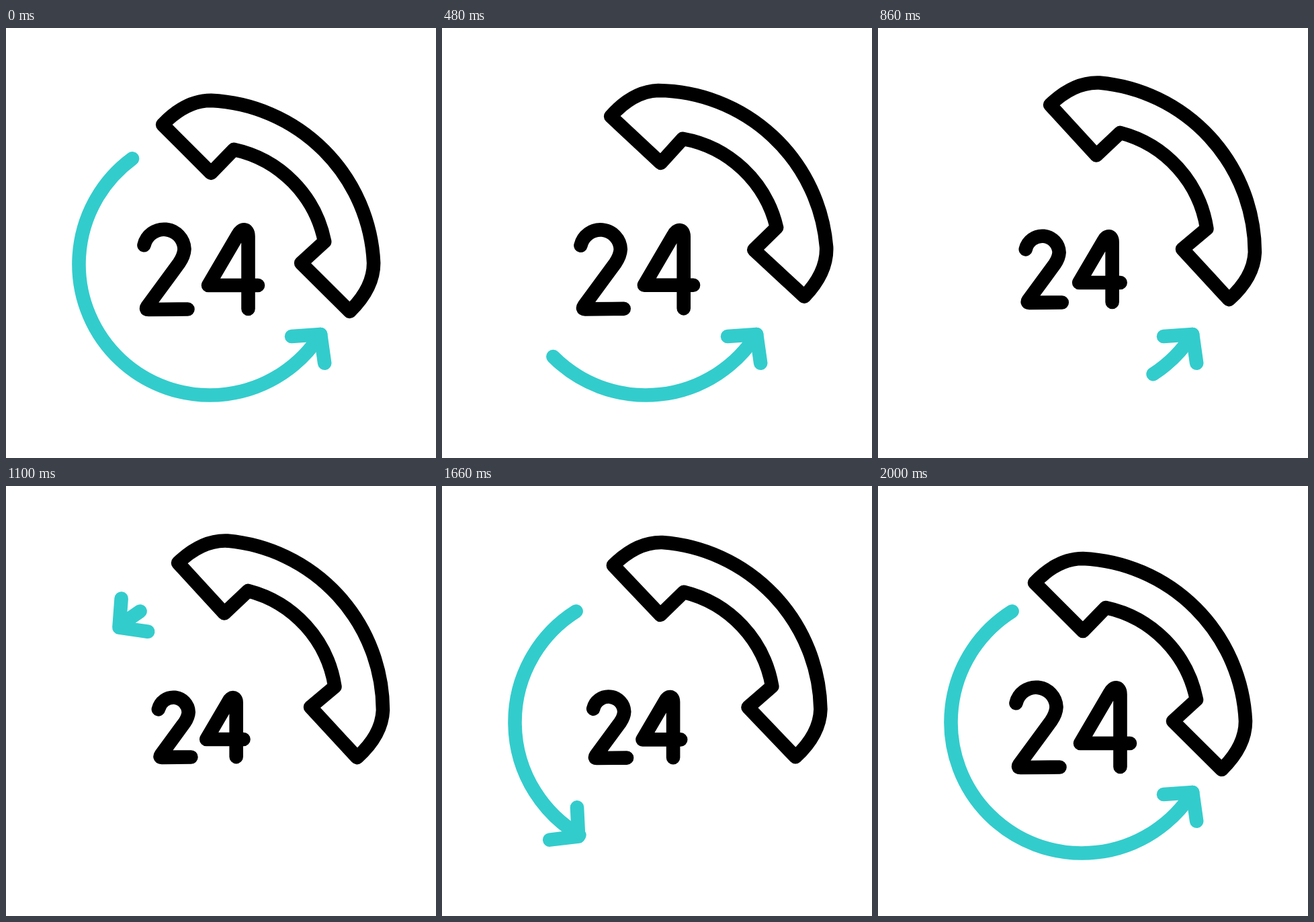
These frames come from a looping animation (640x640 px, 2180 ms). An HTML page:

```html
<!DOCTYPE html>
<html lang="en">
<head>
<meta charset="utf-8">
<title>24 hour call</title>
<style>
  html, body { margin: 0; width: 100%; height: 100%; overflow: hidden; background: #fff; }
  svg { display: block; width: 100%; height: 100%; }
  path { fill: none; stroke: #000; stroke-width: 20.6; stroke-linecap: round; stroke-linejoin: round; }
  .teal { stroke: #33cccc; }
</style>
</head>
<body>
<svg viewBox="0 0 640 640">
  <path id="ring" class="teal"/>
  <path id="head" class="teal"/>
  <path id="digits" d="M205.5 323.3A30.4 30.4 0 0 1 265.5 329Q265 339 257.5 350L210.5 414Q207 419 212 419L270.5 418.5
    M375 383H301L345 308C350 297.5 360.5 297.5 360.5 310V418"/>
  <path id="phone" d="M233 144C252 124 277 108 305 108A254 254 0 0 1 547 350C547 378 531 403 511.5 422L439 350L474 318
    A175 175 0 0 0 339 181L305 216Z"/>
</svg>
<script>
const LOOP = 2180, STEP = 20;
const CENTER = { x: 303.5, y: 351.5 }, RADIUS = 195;
const START = 237.8, SWEEP = 205.4;   // degrees, running counter-clockwise
const END_HEADING = -51;
const PIVOT = "453 206", MIDDLE = { x: 290, y: 359 };
const BARB = 43.2, SPREAD = 47;

const [ring, head, digits, phone] =
  ["ring", "head", "digits", "phone"].map(id => document.getElementById(id));

const linear = u => u;
const smooth = u => u * u * (3 - 2 * u);

// Keys are [time, value] pairs.
function keyed(t, keys, ease) {
  if (t <= keys[0][0]) return keys[0][1];
  for (let i = 1; i < keys.length; i++) {
    const [t0, a] = keys[i - 1], [t1, b] = keys[i];
    if (t <= t1) return a + (b - a) * ease((t - t0) / (t1 - t0));
  }
  return keys[keys.length - 1][1];
}

const SHIFT = [[-20, 0], [380, 20.2], [1780, 20.2], [1980, 0]];
const ROCK = [[380, 0], [680, -7.7], [980, 8], [1280, -7.8], [1580, 5], [1780, -5], [1980, 0]];
const SCALE = [[380, 1], [1180, 0.74], [1580, 0.74], [1980, 1]];
const TRAVEL = [[1080, 8.1], [1580, 95.2], [1980, SWEEP]];
const HEADING = [[1080, 145.3], [1340, 92.7], [1580, 63], [1980, END_HEADING]];

function polar(origin, radius, degrees) {
  const a = degrees * Math.PI / 180;
  return { x: origin.x + radius * Math.cos(a), y: origin.y + radius * Math.sin(a) };
}

const text = p => `${p.x.toFixed(2)} ${p.y.toFixed(2)}`;

function drawRing(from, to) {
  const a = polar(CENTER, RADIUS, START - from), b = polar(CENTER, RADIUS, START - to);
  const large = to - from > 180 ? 1 : 0;
  ring.setAttribute("d", to > from ? `M${text(a)}A${RADIUS} ${RADIUS} 0 ${large} 0 ${text(b)}` : "");
}

function drawHead(tip, heading) {
  const barb = side => text(polar(tip, BARB, heading + 180 + side * SPREAD));
  head.setAttribute("d", `M${barb(1)}L${text(tip)}L${barb(-1)}`);
}

function drawArrow(t) {
  if (t < 1080) {
    drawRing(SWEEP * (t + 20) / 1000, SWEEP);
  } else {
    const reach = Math.min(keyed(t, TRAVEL, linear), 0.5 * (t - 1080));
    drawRing(0, Math.max(reach, 0.05));
  }
  if (t < 1100) {
    drawHead(polar(CENTER, RADIUS, START - SWEEP), END_HEADING);
  } else {
    const bulge = 2.7 * Math.sin(Math.PI * Math.min(1, (t - 1080) / 900));
    const tip = polar(CENTER, RADIUS + bulge, START - keyed(t, TRAVEL, linear));
    drawHead(tip, keyed(t, HEADING, linear));
  }
}

function render(t) {
  drawArrow(t);
  const shift = keyed(t, SHIFT, smooth), rock = keyed(t, ROCK, smooth);
  phone.setAttribute("transform", `translate(${shift} ${-shift}) rotate(${rock} ${PIVOT})`);

  // The digits shrink while their line weight stays the same.
  const s = keyed(t, SCALE, smooth);
  digits.setAttribute("transform",
    `translate(${MIDDLE.x} ${MIDDLE.y}) scale(${s}) translate(${-MIDDLE.x} ${-MIDDLE.y})`);
  digits.style.strokeWidth = 20.6 / s;
}

let begin;
function tick(now) {
  begin ??= now;
  render(Math.floor(((now - begin) % LOOP) / STEP) * STEP);
  requestAnimationFrame(tick);
}
render(0);
requestAnimationFrame(tick);
</script>
</body>
</html>
```
